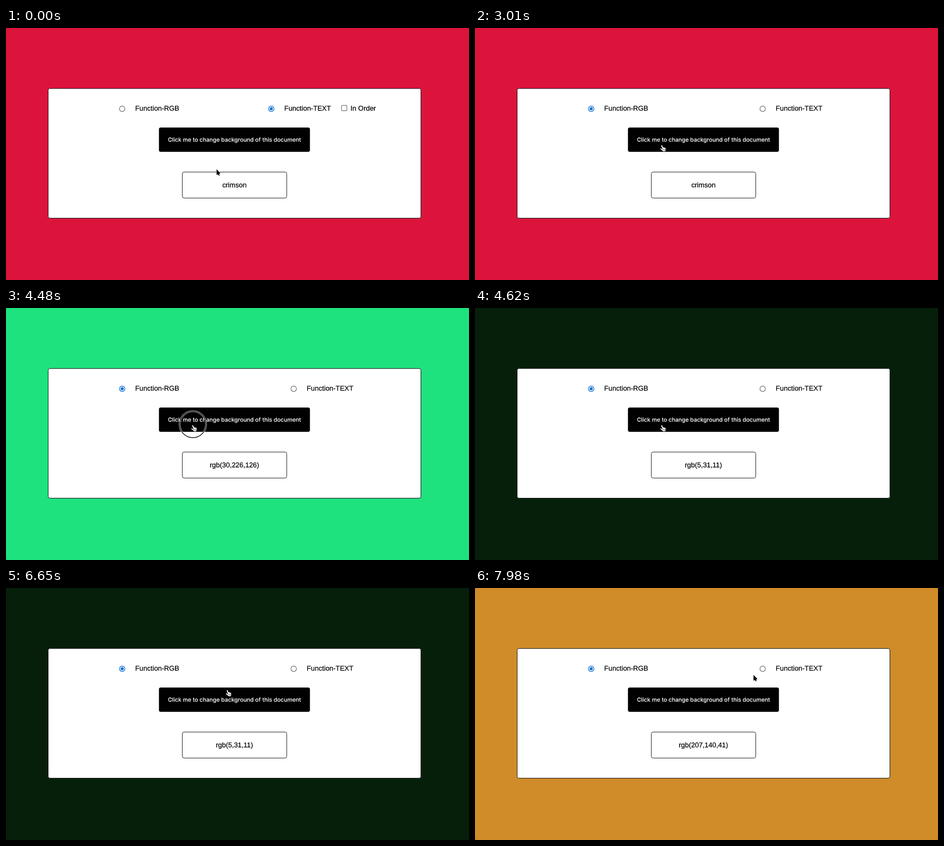
An HTML page with a canvas for the animation above (8 s loop, 1015x552 px).

```html
<!DOCTYPE html>
<html lang="en">
<head>
<meta charset="utf-8">
<title>Background changer</title>
<style>
html, body { margin: 0; width: 100%; height: 100%; overflow: hidden; }
canvas { display: block; width: 1015px; height: 552px; }
</style>
</head>
<body>
<canvas id="stage"></canvas>
<script>
const W = 1015, H = 552, LOOP = 8000, STEP = 70;
const canvas = document.getElementById('stage');
const ctx = canvas.getContext('2d');
const dpr = window.devicePixelRatio || 1;
canvas.width = W * dpr;
canvas.height = H * dpr;
ctx.textRendering = 'geometricPrecision';

const SANS = '15.2px "Liberation Sans", Arial, sans-serif';
const UI = '500 12.45px Inter, sans-serif';
const BLUE = '#1274d2', GREY = '#7b7b7b';
const MID = 500.8;
const RGB_MODE_AT = 2030;

const panel = { x: 92.5, y: 132.5, w: 817, h: 284 };
const button = { x: 335.3, y: 218, w: 331, h: 53.2 };
const field = { x: 386.5, y: 315.5, w: 229, h: 57 };

const backgrounds = [
  { at: 0, color: 'crimson' },
  { at: 3080, color: 'rgb(40,146,127)' },
  { at: 3920, color: 'rgb(30,226,126)' },
  { at: 4620, color: 'rgb(5,31,11)' },
  { at: 6720, color: 'rgb(81,19,5)' },
  { at: 7280, color: 'rgb(207,140,41)' }
];

const home = { x: 461, y: 309 };
const moves = [
  { from: 210, to: 910, x: 250, y: 173 },
  { from: 1330, to: 1540, x: 257, y: 176 },
  { from: 2240, to: 2870, x: 409.3, y: 255 },
  { from: 4620, to: 5460, x: 521, y: 342 },
  { from: 5460, to: 5740, x: 557, y: 341 },
  { from: 5740, to: 6020, x: 475, y: 341 },
  { from: 6020, to: 6230, x: 490, y: 271.6 },
  { from: 6230, to: 6440, x: 485, y: 222 },
  { from: 6860, to: 7000, x: 485, y: 228 },
  { from: 7490, to: 7980, x: 610, y: 190 }
];

// press and release times
const clicks = [[1050, 1190], [1750, 2030], [2870, 3010], [3780, 3920],
  [4480, 4620], [6580, 6650], [7140, 7210]];

const contains = (b, p) => p.x >= b.x && p.x <= b.x + b.w && p.y >= b.y && p.y <= b.y + b.h;
const smooth = k => k * k * (3 - 2 * k);

function box({ x, y, w, h }, r, fill, stroke, width = 1) {
  ctx.beginPath();
  ctx.roundRect(x, y, w, h, r);
  if (fill) { ctx.fillStyle = fill; ctx.fill(); }
  if (stroke) { ctx.strokeStyle = stroke; ctx.lineWidth = width; ctx.stroke(); }
}

function ring(x, y, r, color, width) {
  ctx.beginPath();
  ctx.arc(x, y, r, 0, Math.PI * 2);
  ctx.strokeStyle = color;
  ctx.lineWidth = width;
  ctx.stroke();
}

function line(x0, y0, x1, y1, color, width) {
  ctx.beginPath();
  ctx.moveTo(x0, y0);
  ctx.lineTo(x1, y1);
  ctx.strokeStyle = color;
  ctx.lineWidth = width;
  ctx.stroke();
}

// The thin outline gives the slightly heavier weight of smoothed type.
function text(str, x, y, { font = SANS, color = '#000', align = 'left', bold = 0.25 } = {}) {
  ctx.font = font;
  ctx.fillStyle = ctx.strokeStyle = color;
  ctx.textAlign = align;
  ctx.lineWidth = bold;
  ctx.fillText(str, x, y);
  ctx.strokeText(str, x, y);
}

function radio(x, on, label) {
  ring(x, 176.9, 6, on ? BLUE : GREY, 1.5);
  if (on) ring(x, 176.9, 1.7, BLUE, 3.4);
  text(label, x + 28.6, 180.6);
}

function arrow() {
  for (const [color, grow] of [['#fff', 1.6], ['#000', 0]]) {
    ctx.beginPath();
    ctx.moveTo(0.8, 0.8);
    ctx.lineTo(0.8, 12.6);
    ctx.lineTo(8.9, 9.2);
    ctx.closePath();
    ctx.fillStyle = ctx.strokeStyle = color;
    ctx.lineWidth = 0.4 + grow;
    ctx.stroke();
    ctx.fill();
    line(3.8, 8, 6.3, 14.2, color, 2.2 + grow);
  }
}

function hand() {
  ctx.translate(0, 2);
  ctx.lineCap = 'round';
  for (const [color, grow] of [['#000', 1.5], ['#fff', 0]]) {
    line(0, 1, 3, 8, color, 2.2 + grow);
    line(-2, 7.5, 2.5, 11, color, 2 + grow);
    for (let i = 0; i < 3; i++) line(3.6 + 1.9 * i, 5.2 + 0.5 * i, 4 + 1.7 * i, 10, color, 2 + grow);
    box({ x: 2.2, y: 8, w: 6, h: 5 }, 1.5, color, color, 0.2 + grow);
  }
  for (let i = 0; i < 3; i++) line(3.6 + 1.7 * i, 8.6, 3.9 + 1.7 * i, 11, '#000', 0.6);
}

function beam() {
  for (const [color, width] of [['#fff', 2.8], ['#111', 1.1]]) {
    line(0, -6, 0, 6, color, width);
    line(-2, 3, 2, 3, color, width);
    for (const s of [-1, 1]) {
      ctx.beginPath();
      ctx.moveTo(-3.5, 7.5 * s);
      ctx.quadraticCurveTo(0, 7.5 * s, 0, 5 * s);
      ctx.quadraticCurveTo(0, 7.5 * s, 3.5, 7.5 * s);
      ctx.stroke();
    }
  }
}

function pointerAt(t) {
  let { x, y } = home;
  for (const m of moves) {
    if (t <= m.from) break;
    const k = smooth(Math.min(1, (t - m.from) / (m.to - m.from)));
    x += (m.x - x) * k;
    y += (m.y - y) * k;
  }
  return { x, y };
}

function drawPointer(t, label) {
  const p = pointerAt(t);
  const half = ctx.measureText(label).width / 2;
  const words = { x: MID - half, y: 333, w: half * 2, h: 20 };
  const onButton = contains(button, p);

  if (clicks.some(([down, up]) => t >= down && t < up)) {
    const r = onButton ? 29 : 21;
    ring(p.x + 0.3, p.y, r, 'rgba(255,255,255,.75)', 3.6);
    ring(p.x + 0.3, p.y, r, '#000', 1.5);
  }
  ctx.save();
  ctx.translate(p.x, p.y);
  ctx.lineJoin = 'round';
  (onButton ? hand : contains(words, p) ? beam : arrow)();
  ctx.restore();
}

function drawPanel() {
  ctx.save();
  ctx.shadowColor = 'rgba(110,110,110,.6)';
  ctx.shadowBlur = 2 * dpr;
  ctx.shadowOffsetX = ctx.shadowOffsetY = 0.6 * dpr;
  box(panel, 4, '#fff');
  ctx.restore();
  box(panel, 4, '#fff', '#000');
}

function draw(t) {
  const { color } = backgrounds.filter(b => b.at <= t).pop();
  const rgbMode = t >= RGB_MODE_AT;
  ctx.setTransform(dpr, 0, 0, dpr, 0, 0);
  ctx.fillStyle = '#3c3c3c';
  ctx.fillRect(0, 0, W, H);
  box({ x: 0, y: 0, w: W, h: H }, 2.5, color);
  drawPanel();

  radio(254.7, rgbMode, 'Function-RGB');
  radio(rgbMode ? 630.7 : 581.5, !rgbMode, 'Function-TEXT');
  if (!rgbMode) {
    box({ x: 735.6, y: 169.6, w: 11.6, h: 11.6 }, 1.5, '#fff', GREY, 1.5);
    text('In Order', 755.2, 180.6);
  }

  box(button, 4, '#000');
  text('Click me to change background of this document', MID, 249.3,
    { font: UI, color: '#fff', align: 'center', bold: 0.1 });

  box(field, 4, '#fff', '#000');
  text(color, MID, 349, { align: 'center' });
  drawPointer(t, color);
}

const start = performance.now();
function tick() {
  const t = (performance.now() - start) % LOOP;
  draw(Math.floor(t / STEP) * STEP);
  requestAnimationFrame(tick);
}
tick();
</script>
</body>
</html>
```
